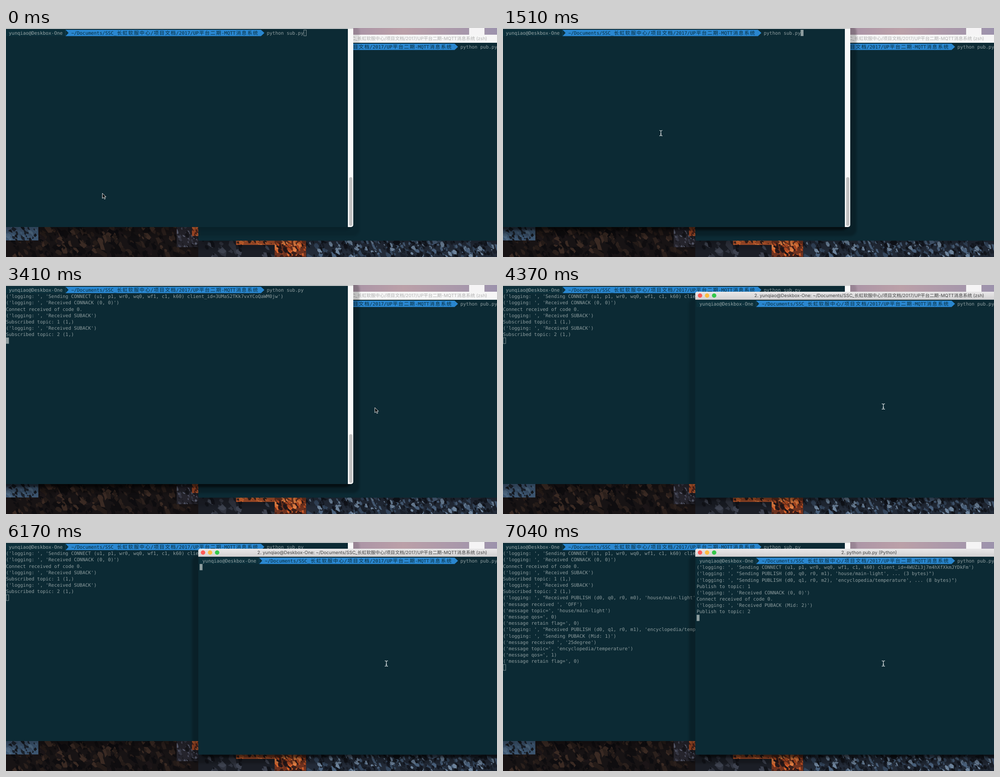
Recreate the animation shown at these times as an HTML page. Size 1093 by 512 pixels, loop 8000 ms.

```html
<!DOCTYPE html>
<html lang="zh">
<head>
<meta charset="utf-8">
<title>MQTT pub/sub terminals</title>
<style>
html, body { margin: 0; width: 100%; height: 100%; overflow: hidden; background: #14161b; }
svg { display: block; }
text { text-rendering: geometricPrecision; white-space: pre; }
.mono { font: 10.48px "DejaVu Sans Mono", monospace; }
.cjk { font: 11px "Noto Sans CJK SC", "Noto Sans CJK", sans-serif; letter-spacing: 1.62px; }
.ui { font: 10.05px Inter, "Noto Sans CJK SC", "Noto Sans CJK", sans-serif; }
.shadow { filter: blur(2px); }
</style>
</head>
<body>
<svg id="stage" width="1093" height="512" viewBox="0 0 1093 512">
  <defs>
    <linearGradient id="sky"><stop stop-color="#aa94a6"/><stop offset=".35" stop-color="#bba0a8"/><stop offset="1" stop-color="#9c92ac"/></linearGradient>
    <linearGradient id="bar" x2="0" y2="1"><stop stop-color="#e9e8e9"/><stop offset="1" stop-color="#d1d0d1"/></linearGradient>
  </defs>
</svg>
<script>
(() => {
const CELL = 6.31, ROW = 14.18, LOOP = 8000;
const BG = '#0c2a34', INK = '#8e9d9f', BLUE = '#2a87d0', SEG = '#0c303b';
const USER = 'yunqiao@Deskbox-One';
const PATH = '~/Documents/SSC_长虹软服中心/项目文档/2017/UP平台二期-MQTT消息系统';
const stage = document.getElementById('stage');

function add(parent, tag, attrs, content) {
  const el = document.createElementNS('http://www.w3.org/2000/svg', tag);
  for (const k in attrs) el.setAttribute(k, attrs[k]);
  if (content) el.textContent = content;
  parent.appendChild(el);
  return el;
}
const rect = (p, x, y, width, height, fill, more) => add(p, 'rect', { x, y, width, height, fill, ...more });
const path = (p, d, fill, more) => add(p, 'path', { d, fill, ...more });
const show = (el, on) => el.setAttribute('visibility', on ? 'inherit' : 'hidden');

// Text on the terminal grid; wide characters take two cells.
function print(p, col, row, str, fill = INK) {
  const g = add(p, 'g', { fill });
  for (const run of str.match(/[\u4e00-\u9fff]+|[^\u4e00-\u9fff]+/g)) {
    const wide = run.charCodeAt(0) > 255;
    add(g, 'text', { x: col * CELL + (wide ? .8 : 0), y: row * ROW + 11, class: wide ? 'cjk' : 'mono' }, run);
    col += run.length * (wide ? 2 : 1);
  }
  return g;
}

function prompt(p, cmd) {
  const a = 21 * CELL, b = 90 * CELL;
  rect(p, 0, 0, a + .5, ROW, SEG);
  rect(p, a, 0, b - a, ROW, BLUE);
  path(p, `M${a} 0l6.8 7.1-6.8 7.1z`, SEG);
  path(p, `M${b - .3} 0l7.6 7.1-7.6 7.1z`, BLUE);
  print(p, 1, 0, USER, '#97a5a6');
  print(p, 23, 0, PATH, '#082c3a');
  print(p, 92, 0, cmd);
}

// Wallpaper: seeded rock facets over flat tones.
let seed = 11;
const rnd = () => (seed = (seed * 16807) % 2147483647) / 2147483647;
function rocks(x, y, w, h, n, size, colours) {
  const [base, ...tones] = colours.split(' ');
  const clip = add(stage, 'svg', { x, y, width: w, height: h });
  rect(clip, 0, 0, w, h, base);
  for (let i = 0; i < n; i++) {
    const cx = rnd() * w, cy = rnd() * h, s = size * (.4 + rnd());
    let d = '';
    for (let k = 0; k < 6; k++) {
      const ang = k * Math.PI / 3, r = s * (.3 + rnd() * .8);
      const px = Math.cos(ang) * r, py = Math.sin(ang) * r * 1.3;
      d += `${k ? 'L' : 'M'}${(cx + px + py * .35).toFixed(1)} ${(cy + py).toFixed(1)}`;
    }
    path(clip, d + 'z', tones[i % tones.length]);
  }
}
rect(stage, 773, 0, 320, 16, 'url(#sky)');
rect(stage, 1030.5, -4, 35, 22, '#f5f4f5', { stroke: '#a79dab', 'stroke-width': 1 });
rocks(0, 440, 428, 72, 330, 7, '#171314 #0f0d0f #241b18 #100e10 #3a2a23 #1b1517 #0d0c0f #2b201c');
rocks(0, 445, 72, 30, 42, 5, '#3c5570 #4d6780 #1c232d #3b5068 #15181e');
rocks(380, 445, 48, 45, 46, 4, '#25242c #4a4c5c #16161b #353642 #5d6173 #1b1a20');
rocks(414, 445, 14, 20, 14, 4, '#b5522b #d56a36 #592a20');
rocks(428, 470, 665, 42, 120, 7, '#1b1e26 #2f333e #111319 #3d424f');
rocks(512, 475, 90, 10, 26, 4, '#a9502b #d9672f #3a211d #e57b3d');
rocks(598, 475, 70, 37, 70, 5, '#6e321f #dd672d #3a1e1a #b84d24 #241719 #e98245');
rocks(668, 475, 425, 37, 330, 5, '#232b38 #141821 #4a617c #1a202a #34465c #11141b #6d839b');

// A wide soft shadow with a darker core just below the window.
function shadow(p, x, y, w, h) {
  const box = (inset, drop) =>
    rect(p, x + inset, y + 15, w - inset * 2, h - 15 + drop, '#000', { class: 'shadow', rx: 14 });
  return [box(-14, 20), box(4, 7)];
}

// Left window
const left = add(stage, 'g', {});
const leftShadow = shadow(left, -30, -20, 803, 465);
path(left, 'M-9-9H773V440a5 5 0 0 1-5 5H-9z', '#f8f8f8');
rect(left, 0, 0, 773, 2, '#d3d3d3');
rect(left, 0, 2, 761, 443, BG);
rect(left, 764, 333.5, 7, 109, '#c1c1c1', { rx: 3.5 });
const sub = add(left, 'g', { transform: 'translate(0 4)' });
prompt(sub, 'python sub.py');

// Right window
const right = add(stage, 'g', {});
const rightShadow = shadow(right, 428, 15, 720, 460);
path(right, 'M428 33V20a5 5 0 0 1 5-5H1100V33z', '#f6f6f6');
const activeBar = add(right, 'g', {});
path(activeBar, 'M428 33V20a5 5 0 0 1 5-5H1100V33z', 'url(#bar)');
rect(activeBar, 428, 32.3, 670, .7, '#b3b1b3');
['#fc5b57', '#fdbc40', '#34c84a'].forEach((fill, i) =>
  add(activeBar, 'circle', { cx: 438.6 + i * 15.7, cy: 23.6, r: 4.9, fill }));
path(right, 'M428 33H1100V475.5H432a4 4 0 0 1-4-4z', BG);
const caption = add(right, 'text', { y: 27.2, class: 'ui', 'text-anchor': 'end' });
const pub = add(right, 'g', { transform: 'translate(431 35)' });
prompt(pub, 'python pub.py');

const log = s => `('logging: ', ${s})`;
const connect = id => log(`'Sending CONNECT (u1, p1, wr0, wq0, wf1, c1, k60) client_id=${id}'`);
const connack = [log("'Received CONNACK (0, 0)'"), 'Connect received of code 0.'];
const suback = n => [log("'Received SUBACK'"), `Subscribed topic: ${n} (1,)`];
const message = (text, topic, qos) => [
  `('message received ', '${text}')`, `('message topic=', '${topic}')`,
  `('message qos=', ${qos})`, "('message retain flag=', 0)"];
const publish = (verb, flags, topic, size) =>
  log(`"${verb} PUBLISH (${flags}), '${topic}', ... (${size} bytes)"`);
const LIGHT = 'house/main-light', TEMP = 'encyclopedia/temperature';

const subLines = [
  connect('3UMaS2TKk7vxYCoQaWM0jw'), ...connack, ...suback(1), ...suback(2),
  publish('Received', 'd0, q0, r0, m0', LIGHT, 3), ...message('OFF', LIGHT, 0),
  publish('Received', 'd0, q1, r0, m1', TEMP, 8), log("'Sending PUBACK (Mid: 1)'"),
  ...message('25degree', TEMP, 1)
].map((s, i) => print(sub, 0, i + 1, s));
const pubLines = [
  connect('4WUZi3j7m4hXfXkmJYDkFm'),
  publish('Sending', 'd0, q0, r0, m1', LIGHT, 3),
  publish('Sending', 'd0, q1, r0, m2', TEMP, 8),
  'Publish to topic: 1', ...connack, log("'Received PUBACK (Mid: 2)'"), 'Publish to topic: 2'
].map((s, i) => print(pub, 0, i + 1, s));

const caret = p => rect(p, .4, .5, 5.6, 13, INK, { stroke: INK, 'stroke-width': .9 });
const subCaret = caret(sub), pubCaret = caret(pub);
function place(el, col, row, solid) {
  el.setAttribute('transform', `translate(${col * CELL} ${row * ROW})`);
  el.setAttribute('fill', solid ? INK : 'none');
}

// Dock label and pointer stay above both windows.
const overlay = add(stage, 'g', {});
const label = add(overlay, 'g', {});
rect(label, -8, 439, 55.5, 20.5, '#bcc2c6', { rx: 4 });
add(label, 'text', { x: 8, y: 453, class: 'ui', fill: '#16191b' }, 'Jelmo');
const pointers = {
  arrow: path(overlay, 'M.5.5V12l2.7-2.5 2 4.2 2-.9-2-4.1h3.6z', '#080b0d', { stroke: '#fff', 'stroke-width': .9 }),
  beam: path(overlay, 'M-3.5-6Q-.5-6 0-4.5Q.5-6 3.5-6M0-4.5V4.5M-3.5 6Q-.5 6 0 4.5Q.5 6 3.5 6M-1.5 2H1.5', 'none',
    { stroke: '#e4e9ea', 'stroke-width': 1.2 })
};

const moves = [
  [0, 'arrow', 214, 369], [120, 'arrow', 191, 381], [300, 'arrow', 112, 425], [420, 'arrow', 24, 467],
  [540, 'none', 0, 0], [1280, 'arrow', 38, 446], [1400, 'beam', 214, 330], [1510, 'beam', 351.5, 235],
  [2820, 'beam', 376, 236], [2940, 'beam', 468, 246], [3060, 'beam', 596, 258], [3170, 'beam', 704, 268],
  [3290, 'arrow', 784, 272], [3410, 'arrow', 820.5, 273.5], [3530, 'arrow', 823, 278],
  [3650, 'arrow', 800, 277], [3770, 'arrow', 764, 275], [3890, 'arrow', 790, 273],
  [4010, 'arrow', 830, 271], [4130, 'arrow', 847, 270], [4370, 'beam', 846.7, 271.7]
];
const subCount = [[0, 0], [2470, 1], [2580, 7], [6560, 18]];
const pubCount = [[0, 0], [6560, 8]];
const captions = [
  [0, `2. ${USER}: ${PATH} (zsh)`, 1071],
  [6320, '2. python pub.py (zsh)', 870],
  [7040, '2. python pub.py (Python)', 877]
];
// Opacity of the wide shadow and of its core.
const leftDepth = [[0, .1, .1], [1020, .22, .55], [4370, .1, .1]];
const rightDepth = [[0, .1, .1], [4370, .15, .3], [4490, .22, .55]];
const at = (table, t) => table.findLast(step => step[0] <= t);
const shade = (boxes, step) => boxes.forEach((el, i) => el.setAttribute('opacity', step[i + 1]));

function draw(t) {
  const swapped = t >= 4370;
  const [back, front] = swapped ? [left, right] : [right, left];
  if (back.nextSibling !== front) {
    stage.insertBefore(back, overlay);
    stage.insertBefore(front, overlay);
  }
  shade(leftShadow, at(leftDepth, t));
  shade(rightShadow, at(rightDepth, t));
  show(activeBar, swapped);

  const [, text, end] = at(captions, t);
  if (caption.textContent !== text) caption.textContent = text;
  caption.setAttribute('x', end);
  caption.setAttribute('fill', swapped ? '#414141' : '#b0b0b0');

  const n = at(subCount, t)[1], m = at(pubCount, t)[1];
  subLines.forEach((el, i) => show(el, i < n));
  pubLines.forEach((el, i) => show(el, i < m));
  const run = t >= 2350;
  place(subCaret, run ? 0 : 105, run ? n + 1 : 0, t >= 1020 && !swapped);
  place(pubCaret, 0, m + 1, true);
  show(pubCaret, t >= 6170);

  show(label, t >= 540 && t < 1280);
  const [, kind, x, y] = at(moves, t);
  for (const k in pointers) {
    show(pointers[k], k === kind);
    pointers[k].setAttribute('transform', `translate(${x} ${y})`);
  }
}

const start = performance.now();
let last = -1;
function tick() {
  const t = Math.floor(Math.max(0, performance.now() - start) % LOOP / 10) * 10;
  if (t !== last) draw(last = t);
  requestAnimationFrame(tick);
}
tick();
})();
</script>
</body>
</html>
```
